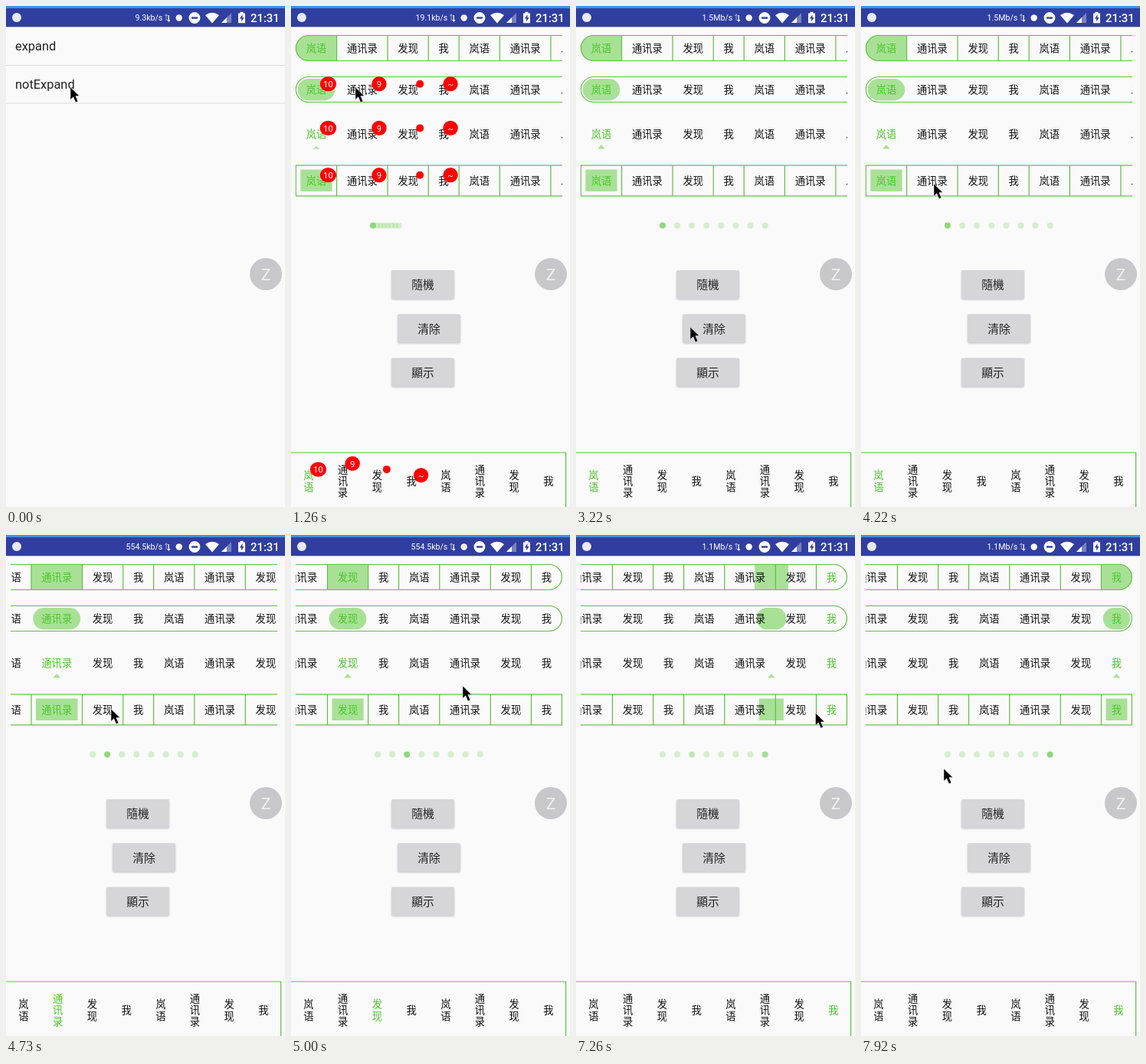
Animation, 364 px wide and 654 px high, one loop 8000 ms. Source, as an HTML page:

```html
<!DOCTYPE html>
<html lang="zh">
<head>
<meta charset="utf-8">
<title>Tab strips</title>
<style>
  html, body { margin: 0; width: 100%; height: 100%; overflow: hidden; background: #fafafa; }
  svg { display: block; width: 364px; height: 654px; }
  text { font-family: Roboto, "Noto Sans CJK SC", "Noto Sans CJK", sans-serif; }
  .mid { text-anchor: middle; }
  .tab { font-size: 13.3px; font-weight: 500; fill: #111; }
  .tab.on { fill: #4cc52a; }
  .line { fill: none; stroke: #62be45; stroke-width: 1.2; }
  .mark { fill: #a8e196; }
  .badge { fill: #f00; }
  .badge text { font-size: 11.5px; fill: #fff; }
  .button { font-size: 14.8px; font-weight: 500; fill: #222; }
</style>
</head>
<body>
<svg id="stage" viewBox="0 0 364 654"></svg>
<script>
const LOOP = 8000, OPEN = 1110, CLEAR = 2680, SLIDE = 240;
const LABELS = ['岚语', '通讯录', '发现', '我', '岚语', '通讯录', '发现', '我'];
const BADGES = ['10', '9', '', '~'];

// Each tab is its text plus one em of padding on both sides
const EM = 13.3, LEFT = 6.4, VIEW = 347;
let edge = LEFT;
const tabs = LABELS.map(s => {
  const w = EM * (s.length + 2), x = edge;
  edge += w;
  return { x, w, mid: x + w / 2 };
});
const TOTAL = edge - LEFT;
const scrollFor = i => i ? Math.min(TOTAL - VIEW, tabs[i - 1].mid - LEFT) : 0;

// Pointer stops: when it arrives, when it leaves, and where
const STOPS = [
  { from: 0, to: 1380, x: 84, y: 106 },
  { from: 2400, to: 2680, x: 164, y: 424 },
  { from: 2830, to: 3370, x: 149, y: 419 },
  { from: 3940, to: 4460, x: 95, y: 232 },
  { from: 4730, to: 4850, x: 137, y: 227 },
  { from: 5000, to: 5510, x: 224, y: 197 },
  { from: 6710, to: 7240, x: 319, y: 230 },
  { from: 7920, to: LOOP, x: 108, y: 305 },
];
const SPEEDS = [[0, '9.3kb/s'], [280, '19.1kb/s'], [2280, '1.5Mb/s'], [4280, '554.5kb/s'], [6280, '1.1Mb/s']];
const TAPS = [[0, 0], [4220, 1], [4760, 2], [7110, 7]];

const mix = (a, b, p) => a + (b - a) * p;
const ramp = (t, from, to) => Math.max(0, Math.min(1, (t - from) / (to - from)));
const ease = p => (1 - Math.cos(Math.PI * p)) / 2;
const lastIndex = (table, t) => table.filter(row => row[0] <= t).length - 1;

const label = (s, x, y, cls = '', extra = '') =>
  `<text class="mid ${cls}" x="${x}" y="${y}" dy=".37em" ${extra}>${s}</text>`;
const rect = (x, y, w, h, extra = '') =>
  `<rect x="${x}" y="${y}" width="${w}" height="${h}" ${extra}/>`;

function badge(s, x, y) {
  const rx = s ? 8.7 + s.length : 5, ry = s ? 9.6 : 5;
  return `<g transform="translate(${x} ${y})"><g class="badge">
    <ellipse rx="${rx}" ry="${ry}"/>${label(s, 0, 0)}</g></g>`;
}

function strip(y, { mark, frame = '', divider = 0, badges = false }) {
  const dividers = tabs.slice(1).map(t =>
    divider ? `<path class="line" d="M${t.x} ${y - divider / 2}v${divider}"/>` : '');
  const texts = tabs.map((t, i) => label(LABELS[i], t.mid, y, 'tab', `data-i="${i}"`));
  const counts = BADGES.map((s, i) =>
    badges ? badge(s, tabs[i].mid + EM * LABELS[i].length / 2 + 2.2, y - 7.3) : '');
  return `<g class="scroll">${[mark, frame, ...dividers, ...texts, ...counts].join('')}</g>`;
}

// Bottom tabs stack their characters around one centre line
const columnX = i => 23 + 44.7 * i;
const column = (s, i) => [...s].map((ch, k) =>
  label(ch, columnX(i), 620 + (k - (s.length - 1) / 2) * 15.3, 'tab', `data-i="${i}"`)).join('');
const columnBadge = (s, i) => badge(s, columnX(i) + 12.5, 620.2 - 7.65 * LABELS[i].length);

const button = (s, x, y) => `
  ${rect(x, y + 1.2, 82, 37.3, 'rx="2" opacity=".2" filter="url(#soft)"')}
  ${rect(x, y, 82, 37.3, 'rx="2" fill="#d6d5d8"')}
  ${label(s, x + 41, y + 19, 'button')}`;

const pill = (y, cls) => rect(LEFT, y, TOTAL, 33, `rx="16.5" class="${cls}"`);
const mark = (y, h, inset, r = 0) =>
  rect(0, y, 0, h, `rx="${r}" class="mark" data-inset="${inset}"`);

const statusBar = `
  ${rect(0, 0, 364, 27.3, 'fill="#303f9f"')}${rect(0, 0, 364, 3, 'fill="#4390df"')}
  <g fill="#fff">
    <circle cx="14" cy="15" r="6" fill="#e8eaf6"/>
    <text id="speed" x="204.3" y="19.3" text-anchor="end" font-size="10.6"></text>
    <path d="M208.5 19v-6h-2l2.6-3 2.6 3h-2v6z" opacity=".45"/>
    <path d="M211.5 12v6h-1.6l2.4 3 2.4-3h-1.7v-6z" opacity=".85"/>
    <circle cx="225.7" cy="15.5" r="4.2"/>
    <circle cx="246" cy="15.5" r="7.4"/>${rect(242, 14.3, 8, 2.4, 'fill="#303f9f"')}
    <path d="M260 12q9-6.5 18 0l-9 10.5z"/>
    <path d="M294 9v13h-13z" opacity=".35"/><path d="M288 15v7h-7z"/>
    <path d="M303 9.5h2.5v-1.7h4v1.7h2.5v12.8h-9z"/>
    <path d="M308.5 11l-3.6 5.4h2.2v4.2l3.4-5.6h-2z" fill="#303f9f"/>
    <text x="319" y="20.8" font-size="14.9" font-weight="500">21:31</text>
  </g>`;

const listScreen = `
  <g font-size="16.4" fill="#212121"><text x="12" y="58.3">expand</text><text x="12" y="108.3">notExpand</text></g>
  <path d="M0 77.5H364M0 127H364" stroke="#dcdcdc" stroke-width="1.2"/>
  <circle id="ripple" cx="92.5" cy="105.5" r="20.8" opacity=".09"/>`;

const tabScreen = `<g id="tabScreen">
  ${rect(0, 27.3, 364, 627, 'fill="#fafafa"')}
  <g clip-path="url(#view)">
    ${strip(55, { mark: `<g clip-path="url(#pillClip)">${mark(38.5, 33, 0)}</g>`, frame: pill(38.5, 'line'), divider: 33 })}
    ${strip(109, { mark: mark(95, 28.4, 2.3, 14.2), frame: pill(92.5, 'line'), badges: true })}
    ${strip(166.7, { mark: '<path id="arrow" class="mark" d="M-4.8 0L0 -5.5L4.8 0z"/>', badges: true })}
    ${strip(228, { mark: mark(213.5, 28.5, 6), frame: rect(LEFT, 208, TOTAL, 40, 'class="line"'), divider: 40, badges: true })}
  </g>
  ${LABELS.map(() => '<circle class="dot" cy="286.4" r="4" fill="#8fd87b"/>').join('')}
  ${button('隨機', 131, 345)}${button('清除', 139, 402.2)}${button('顯示', 131, 459.5)}
  <path class="line" d="M0 583H358.6V654"/>
  ${LABELS.map(column).join('')}${BADGES.map(columnBadge).join('')}
</g>`;

const stage = document.getElementById('stage');
stage.innerHTML = `<defs>
    <clipPath id="view">${rect(6, 28, VIEW + 1, 225)}</clipPath>
    <clipPath id="pillClip">${pill(38.5, '')}</clipPath>
    <filter id="soft" x="-10%" y="-10%" width="120%" height="130%"><feGaussianBlur stdDeviation="1"/></filter>
  </defs>
  ${rect(0, 0, 364, 654, 'fill="#fafafa"')}${listScreen}${tabScreen}${statusBar}
  <circle cx="339" cy="350" r="21" fill="#c8c7ca"/>
  ${label('Z', 339, 350, '', 'font-size="21" fill="#f1f1f2"')}
  <path id="pointer" d="M0 0V16.2L3.8 12.8L6.8 19.8L9.9 18.4L6.9 11.6H11.8Z" stroke="#fff" stroke-width=".5"/>`;

const $ = id => document.getElementById(id);
const all = sel => [...stage.querySelectorAll(sel)];
const scrolls = all('.scroll'), marks = all('rect.mark'), names = all('.tab'),
  dots = all('.dot'), badges = all('.badge');

function pointerAt(t) {
  const i = STOPS.findIndex(s => t < s.to), b = STOPS[i], a = STOPS[i - 1] || b;
  const p = ramp(t, a.to, b.from);
  return t >= b.from ? [b.x, b.y] : [mix(a.x, b.x, p), mix(a.y, b.y, p)];
}

function drawTabs(t) {
  const k = lastIndex(TAPS, t), [start, to] = TAPS[k], from = TAPS[Math.max(0, k - 1)][1];
  const p = ease(ramp(t, start, start + SLIDE));
  const x = mix(tabs[from].x, tabs[to].x, p), w = mix(tabs[from].w, tabs[to].w, p);
  const shift = mix(scrollFor(from), scrollFor(to), p);
  const chosen = p < 0.5 ? from : to;

  scrolls.forEach(g => g.setAttribute('transform', `translate(${-shift} 0)`));
  marks.forEach(m => {
    const inset = +m.dataset.inset;
    m.setAttribute('x', x + inset);
    m.setAttribute('width', w - 2 * inset);
  });
  const grow = mix(0.4, 1, ramp(t, OPEN, OPEN + 450));
  $('arrow').setAttribute('transform', `translate(${x + w / 2} 186.5) scale(1 ${grow})`);
  names.forEach(n => n.classList.toggle('on', +n.dataset.i === chosen));

  const spread = ease(ramp(t, OPEN + 150, OPEN + 630));
  dots.forEach((d, i) => {
    const lit = i === to ? Math.max(p, +(from === to)) : i === from ? 1 - p : 0;
    d.setAttribute('cx', mix(107 + 4.8 * i, 113 + 19.1 * i, spread));
    d.setAttribute('opacity', mix(0.36, 1, lit));
  });
}

function draw(t) {
  $('ripple').style.display = t >= 840 ? '' : 'none';
  $('tabScreen').style.display = t >= OPEN ? '' : 'none';
  $('tabScreen').setAttribute('opacity', mix(0.6, 1, ramp(t, OPEN, OPEN + 150)));
  $('speed').textContent = SPEEDS[lastIndex(SPEEDS, t)][1];
  $('pointer').setAttribute('transform', `translate(${pointerAt(t)})`);
  drawTabs(t);
  const size = 1 - ramp(t, CLEAR, CLEAR + 270);
  badges.forEach(b => b.setAttribute('transform', `scale(${size})`));
}

function loop() {
  draw(performance.now() % LOOP);
  requestAnimationFrame(loop);
}
loop();
</script>
</body>
</html>
```
